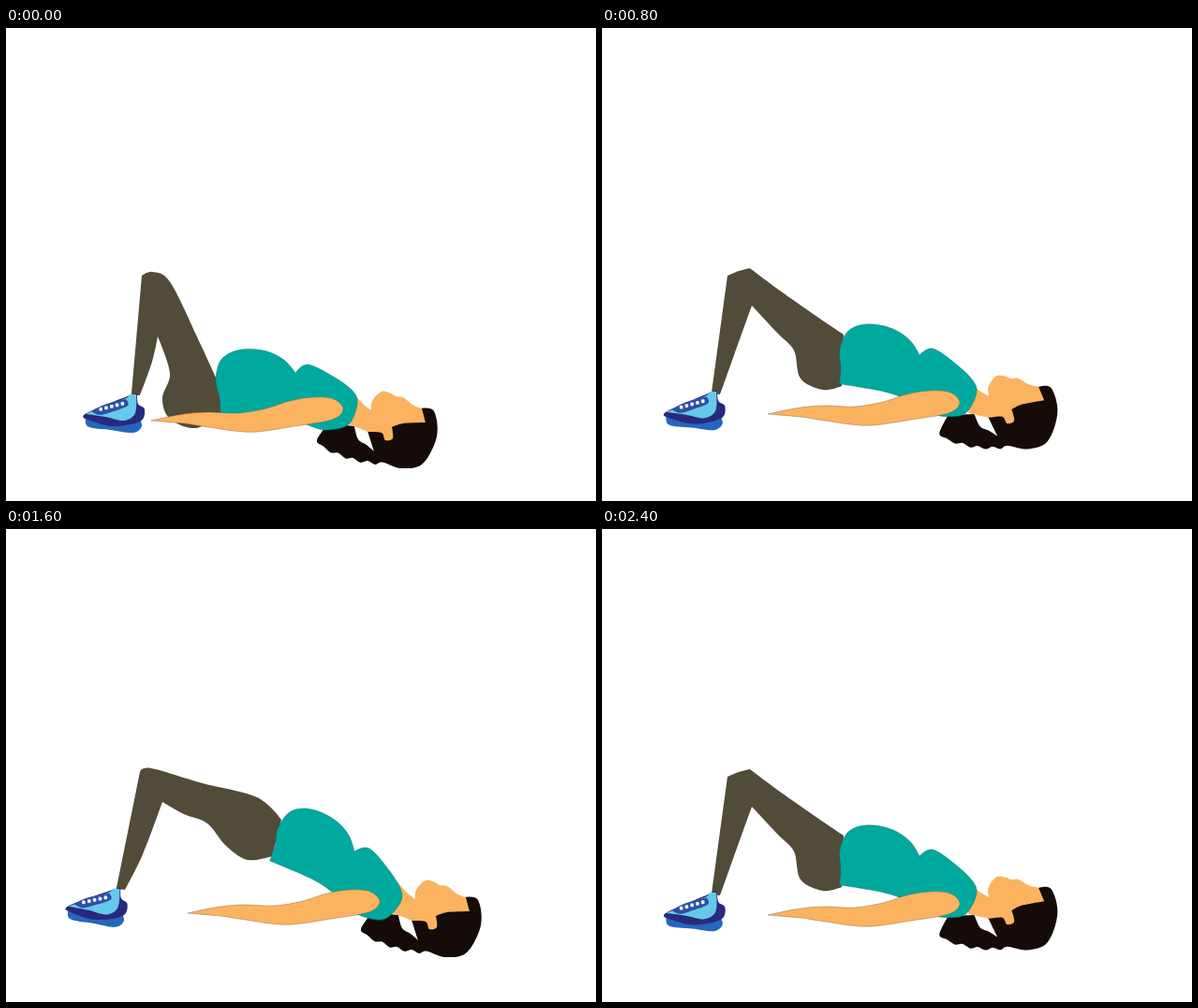
These frames come from a looping animation (630x506 px, 3.2 s). An HTML page:

```html
<!DOCTYPE html>
<html lang="en">
<head>
<meta charset="utf-8">
<title>Bridge exercise</title>
<style>
  html, body { margin: 0; width: 100%; height: 100%; overflow: hidden; background: #fff; }
  svg { display: block; width: 630px; height: 506px; }
</style>
</head>
<body>
<svg id="stage" viewBox="0 0 630 506"></svg>
<script>
const STEP = 800;
const ORDER = [0, 1, 2, 1];
const SKIN = '#fbb360', HAIR = '#150b09', TEAL = '#00a99d', PANTS = '#514b39';
const NAVY = '#29297c', BLUE = '#2566bd', SKY = '#65c9e9', LACE = '#2d4fa9';

// Closed smooth curve through "x,y" points; a trailing ! marks a sharp corner.
function curve(text) {
  const pts = text.trim().split(/\s+/).map(s => {
    const [x, y] = s.replace('!', '').split(',').map(Number);
    return { x, y, k: s.endsWith('!') ? 0 : 1 / 6 };
  });
  const n = pts.length;
  let d = `M${pts[0].x},${pts[0].y}`;
  for (let i = 0; i < n; i++) {
    const [a, b, c, e] = [-1, 0, 1, 2].map(j => pts[(i + j + n) % n]);
    d += `C${b.x + (c.x - a.x) * b.k},${b.y + (c.y - a.y) * b.k} ` +
         `${c.x - (e.x - b.x) * c.k},${c.y - (e.y - b.y) * c.k} ${c.x},${c.y}`;
  }
  return d + 'Z';
}

// Points of a wavy, slightly sagging edge.
function wave(x0, y0, x1, y1, bumps, amp, sag) {
  return Array.from({ length: 2 * bumps + 1 }, (_, i) => {
    const t = i / (2 * bumps);
    const y = y0 + (y1 - y0) * t + sag * Math.sin(Math.PI * t) + (i % 2 ? amp : -amp);
    return `${x0 + (x1 - x0) * t},${y}`;
  }).join(' ');
}

const shape = (fill, pts, edge = 'none') =>
  `<path fill="${fill}" d="${curve(pts)}" stroke="${edge}" stroke-width=".4"/>`;

const head =
  shape(HAIR, `443,407! 457,410 460,437 445,466 422,471 ${wave(402, 466, 339, 449, 4, 1.5, 4)}
    332,441 344,423! 372,426! 376,440 385,446 393,453! 386,431! 420,423`) +
  shape(SKIN, `366,384! 380,401 390,409! 391,399 401,389 411,391 416,394 424,395
    434,403 444,407! 448,422! 424,423 412,427! 413,439 405,441 401,433 387,432! 366,424!`);

const shirt = shape(TEAL, `229,412! 228,395 224,376 229,356 243,346 262,343.5 282,347 298,356
  309,369! 322,360 348,372 370,388 375,402 366,424 344,430 331,428! 303,418 276,413`, '#0b6f68');

const arm = shape(SKIN, `155,420! 178,415 198,412 218,411 248,412 278,407 303,399 328,395
  350,397 360,408 348,419 308,426 268,432 243,431 223,428 203,425 190,423`, '#7d5a30');

const laces = [0, 1, 2, 3, 4].map(i =>
  `<rect x="${99.4 + 5.8 * i}" y="${406 - 1.5 * i}" width="3.6" height="3.8" rx="1" fill="#f1f3ee"/>`).join('');

const shoe =
  shape(BLUE, `86,412! 87,426 112,430 136,433 145,426 142,417!`) +
  shape(NAVY, `132,393 140,391! 141,402 148,408 143,421 113,426 85,418! 86,412`) +
  shape(SKY, `85,413! 102,406 128,396 131,392! 139,392! 138,412 126,420 106,416`) +
  shape(LACE, `91,410! 105,403 128,397! 130,404 112,411 100,414`) +
  laces;

// Rigid parts only shift and turn; the legs bend, so each pose has its own outline.
const turn = (dx, dy, angle, px, py) => `translate(${dx} ${dy}) rotate(${angle} ${px} ${py})`;
const pose = (legs, torso, headMove, armMove, foot) => ({
  legs,
  shirt: turn(...torso, 309, 369),
  head: turn(...headMove, 400, 430),
  arm: turn(...armMove, 155, 420),
  shoe: turn(...foot, 116, 412)
});

const poses = [
  pose(`145,265! 157,261 176,273 208,339 229,385! 230,412! 203,428 175,418
    167,396 175,369 162,330! 156,357 143,393! 134,393!`,
    [0, 0, 0], [0, 0, 0], [0, 0, 0], [0, 0, 0]),
  pose(`134,265! 146,260 158,257! 190,281 230,309 258,328! 256,383! 236,387 212,375
    205,345 188,327 160,297! 141,350 126,392! 117,391!`,
    [30, -19, 8.5], [26, -17, -8.3], [22, -7, 0], [-16.5, -2.5, -1]),
  pose(`143,260! 155,256 210,272 268,287 294,311! 284,350! 258,354 235,339 215,315
    190,305 167,292! 146,348 127,386! 118,385!`,
    [63, -24, 22], [47, -13, 0], [39, -9, 0], [-18.5, -8, 2.5])
];

const stage = document.getElementById('stage');
const part = (move, art) => `<g transform="${move}">${art}</g>`;
stage.innerHTML = poses.map(p => '<g>' +
  shape(PANTS, p.legs) +
  part(p.shoe, shoe) +
  part(p.head, head) +
  part(p.shirt, shirt) +
  part(p.arm, arm) + '</g>').join('');

const groups = [...stage.children];
const start = performance.now();
function draw() {
  const step = Math.floor((performance.now() - start) / STEP) % ORDER.length;
  groups.forEach((g, i) => g.style.display = i === ORDER[step] ? '' : 'none');
  requestAnimationFrame(draw);
}
draw();
</script>
</body>
</html>
```
